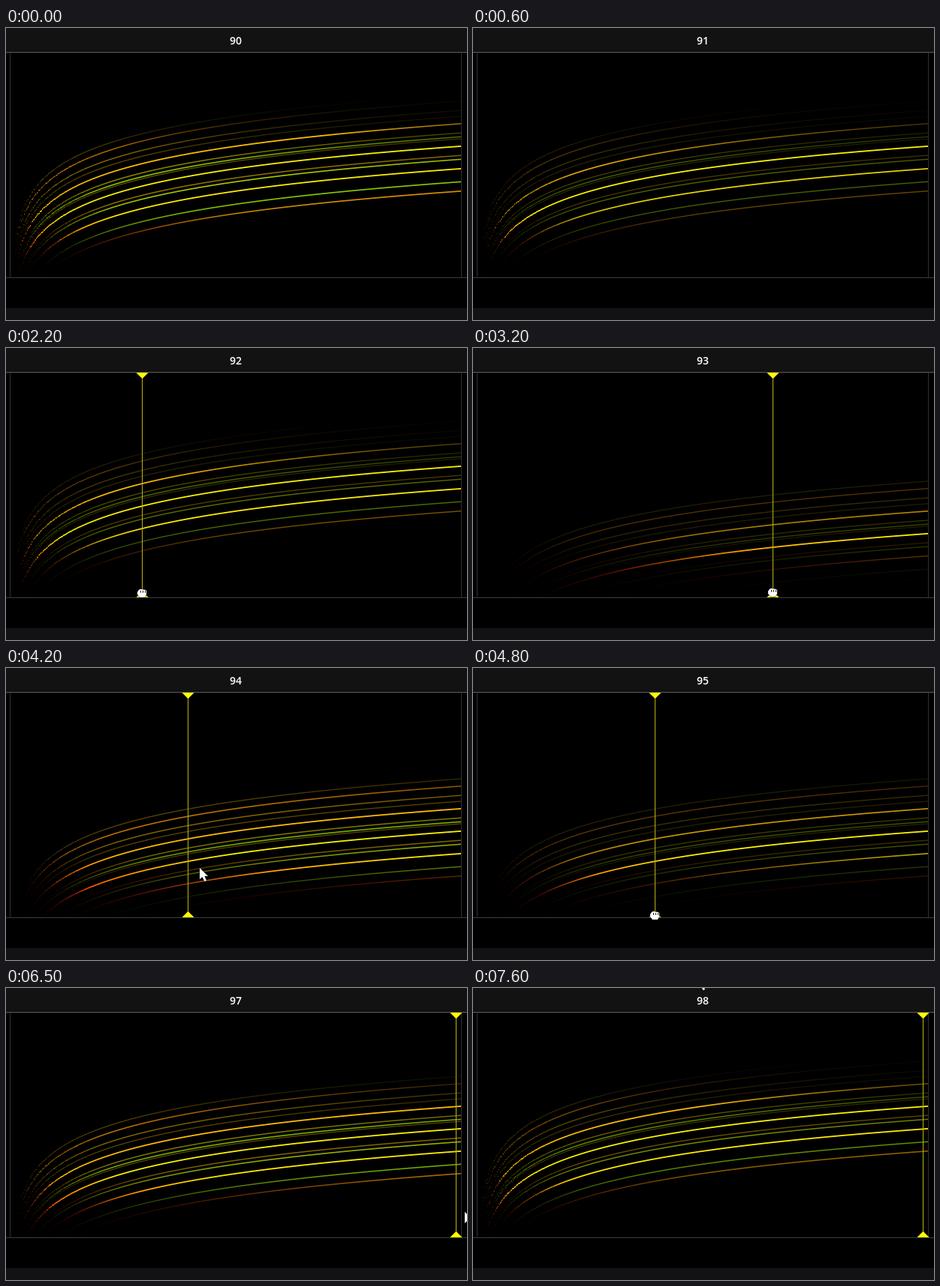
An HTML page with a canvas that plays this animation: 614 by 390 pixels, repeating every 7700 ms.

```html
<!DOCTYPE html>
<html>
<head>
<meta charset="utf-8">
<style>
html, body { margin: 0; width: 614px; height: 390px; overflow: hidden; background: #000; }
canvas { display: block; }
</style>
</head>
<body>
<canvas id="stage" width="614" height="390"></canvas>
<script>
const ctx = document.getElementById('stage').getContext('2d');
const LOOP = 7700, STEP = 100;
const LEFT = 6, RIGHT = 606, TOP = 33, BOTTOM = 333, OCTAVE = 30;

// start time in seconds, octaves down
const notes = [[0, 0], [1, 1], [1.7, 0], [2.4, 3], [4.1, 2], [5, 0], [6.4, 1], [7.3, 0]];

// time, x, y
const pointer = [[0.9, 138, 205], [1.4, 138, 205], [2, 137, 328], [3.2, 399, 327], [4, 242, 328],
  [4.2, 258, 267], [4.5, 250, 346], [4.8, 242, 331], [5.4, 602, 331], [6.3, 602, 331],
  [6.5, 611, 299], [7.2, 330, 3], [7.6, 300, -15]];

const partials = makePartials();

function makePartials() {
  const list = [];
  for (let k = 0; k < 5; k++) {
    list.push({
      ratio: 2 ** k,
      strength: 3.2 * 0.45 ** Math.abs(k - 2),
      hue: Math.max(36, 58 - 7 * (k - 1.6) ** 2),
    });
  }
  for (let k = 0; k < 3; k++) {
    list.push({ ratio: 4 / 3 * 2 ** k, strength: 0.6, hue: 78 - 8 * (k % 2) });
    list.push({ ratio: 3 * 2 ** k, strength: 0.45, hue: 46 + 8 * (k % 2) });
    list.push({ ratio: 5 * 2 ** k, strength: 0.3, hue: 46 });
  }
  return list;
}

const clamp = (v, lo, hi) => Math.max(lo, Math.min(hi, v));
const loudness = y => Math.exp(-((Math.abs(y - 210) / 78) ** 3));

function pointerAt(t) {
  const i = pointer.findIndex(p => t <= p[0] + 1e-6);
  if (i < 1) return pointer.at(i).slice(1);
  const [from, x0, y0] = pointer[i - 1], [to, x1, y1] = pointer[i];
  const p = (t - from) / (to - from);
  return [x0 + (x1 - x0) * p, y0 + (y1 - y0) * p];
}

function randomizer(seed) {
  return () => {
    seed = (seed * 1664525 + 1013904223) >>> 0;
    return seed / 4294967296;
  };
}

function rect(color, x, y, w, h) {
  ctx.fillStyle = color;
  ctx.fillRect(x, y, w, h);
}

function shape(fill, points, x, y, outline) {
  ctx.beginPath();
  points.forEach(([dx, dy]) => ctx.lineTo(x + dx, y + dy));
  ctx.closePath();
  if (outline) {
    ctx.strokeStyle = outline;
    ctx.stroke();
  }
  ctx.fillStyle = fill;
  ctx.fill();
}

function drawPanel(t) {
  rect('#000', 0, 0, 614, 390);
  rect('#121212', 0, 0, 614, 32);
  rect('#5c5c5c', 0, 32, 614, 1);
  rect('#121214', 0, 374, 614, 16);
  for (const x of [5, RIGHT]) rect('#303030', x, TOP, 1, 300);
  rect('#3c3c3c', 0, BOTTOM, 614, 1);
  ctx.fillStyle = '#fff';
  ctx.font = '600 14px "Open Sans", "Noto Sans", sans-serif';
  ctx.textAlign = 'center';
  ctx.fillText(Math.floor(90.5 + t + 1e-6), 306, 22);
}

function drawCurves(t, frame) {
  const [start, octaves] = notes.filter(n => n[0] <= t + 1e-6).pop();
  const gain = 1.3 * Math.exp(1.2 * (start - t));
  const random = randomizer(frame * 977 + 31);
  for (const { ratio, strength, hue } of partials) {
    const end = 218 + OCTAVE * (octaves - Math.log2(ratio));
    for (let x = LEFT + 5; x < RIGHT; x++) {
      const d = x - LEFT + 0.5;
      const near = Math.max(0, 1 - d / 130);
      const scatter = (random() - 0.5) * near * Math.min(7, 90 / d);
      const y = end + OCTAVE * Math.log2(600 / d) + scatter;
      const level = strength * gain * loudness(y) * (1 - random() * near);
      if (y < TOP || y >= BOTTOM - 1 || level < 0.02) continue;
      const redden = hue < 65 ? clamp(1 - (y - 250) / 65, 0.15, 1) : 1;
      ctx.globalAlpha = Math.min(1, level);
      rect(`hsl(${hue * redden},100%,50%)`, x, y - 1, 1, 1.2 + 0.6 * Math.min(1, level));
    }
  }
  ctx.globalAlpha = 1;
}

function drawSlider(t) {
  const held = t < 4.8 ? clamp(t, 2, 4) : Math.min(t, 5.4);
  const x = Math.round(Math.min(599, pointerAt(held)[0]));
  rect('#b9b21c', x, TOP, 1, 300);
  shape('#ff0', [[-8, 0], [8, 0], [0, 8]], x + 0.5, TOP);
  shape('#ff0', [[-8, 0], [8, 0], [0, -8]], x + 0.5, BOTTOM);
}

function drawHand(x, y) {
  const fist = [[-6, -2], [-4, -5], [-2, -6], [4, -5], [6, -4], [6, 1], [4, 5], [-3, 5], [-6, 1]];
  shape('#fff', fist, x, y, '#111');
  for (const dx of [-2, 1, 4]) rect('#222', x + dx, y - 4, 1, 3);
}

function drawArrow(x, y) {
  shape('#fff', [[0, 0], [0, 15], [3.5, 12], [6.5, 18], [9, 17], [6.5, 11], [11, 11]], x, y, '#111');
}

function drawPointer(t) {
  const [x, y] = pointerAt(t).map(Math.round);
  const dragging = (t >= 1.9 && t <= 4) || (t >= 4.8 && t <= 6.3);
  (dragging ? drawHand : drawArrow)(x, y);
}

function render(frame) {
  const t = frame * STEP / 1000;
  drawPanel(t);
  drawCurves(t, frame);
  if (t < 0.9) return;
  drawSlider(t);
  drawPointer(t);
}

let origin, shown = -1;
function tick(now) {
  origin ??= now;
  const frame = Math.floor((now - origin) % LOOP / STEP);
  if (frame !== shown) render(shown = frame);
  requestAnimationFrame(tick);
}
render(0);
requestAnimationFrame(tick);
</script>
</body>
</html>
```
